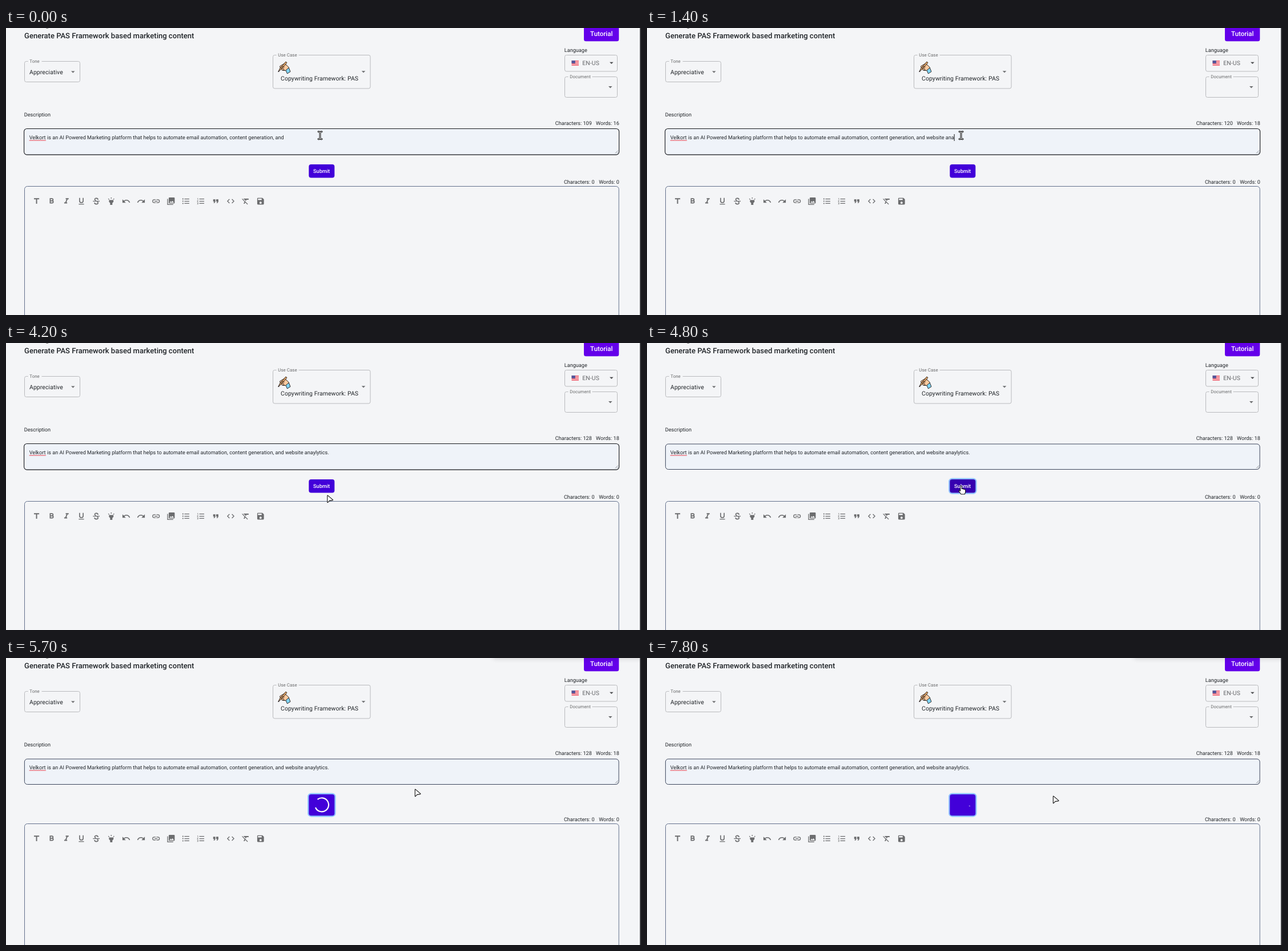
Animation of 1112 by 503 pixels, one loop 8000 ms. Source, as an HTML page:

```html
<!DOCTYPE html>
<html lang="en">
<head>
<meta charset="utf-8">
<title>Content generator</title>
<style>
html, body { margin: 0; width: 100%; height: 100%; overflow: hidden; background: #f4f5f7; }
svg { display: block; width: 1112px; height: 503px; font: 9.14px Roboto, sans-serif; fill: #212529; text-rendering: geometricPrecision; }
text { white-space: pre; }
.label { font-size: 7.84px; letter-spacing: .00938em; fill: #696a6b; }
.value { font-size: 10.45px; letter-spacing: .00938em; }
.end { text-anchor: end; }
.frame { fill: none; stroke: #b9babd; stroke-width: 1; }
.icon { fill: #6c6d6f; }
.line { fill: none; stroke: #6c6d6f; stroke-width: 2; }
.button { font-weight: 500; fill: #fff; }
.cursor { fill: #fff; stroke: #151515; stroke-width: 1.1; stroke-linejoin: round; }
</style>
</head>
<body>
<svg viewBox="0 0 1112 503">
  <defs>
    <filter id="blur" x="-20%" y="-80%" width="140%" height="260%"><feGaussianBlur stdDeviation="4.5"/></filter>
    <path id="beamShape" d="M-3-6.5q3 0 3 1.5v10q0 1.5-3 1.5M3-6.5q-3 0-3 1.5m0 10q0 1.5 3 1.5"/>
  </defs>
  <rect width="1112" height="503" fill="#f4f5f7"/>
  <path d="M70 0h4.5l-1 .8h-3z" fill="#555"/>
  <text x="32" y="17.6" font-size="13.06" font-weight="500">Generate PAS Framework based marketing content</text>

  <rect x="1012" y="-6" width="61.3" height="29.2" rx="3.5" fill="#6400ea"/>
  <text class="button" x="1042.8" y="13.6" font-size="11.5" text-anchor="middle">Tutorial</text>

  <g id="fields"></g>
  <text class="value" x="41" y="80.8">Appreciative</text>
  <text class="value" x="481" y="92.2">Copywriting Framework: PAS</text>
  <text class="value" x="1009.3" y="65.2" fill="#66676a">EN-US</text>
  <text x="977.8" y="42.4">Language</text>

  <g id="flag">
    <rect x="990.5" y="57" width="12.5" height="9" fill="#fbe9ec"/>
    <path d="M990.5 57.7h12.5m-12.5 2.5h12.5m-12.5 2.6h12.5m-12.5 2.5h12.5" stroke="#f0606f" stroke-width="1.4"/>
    <rect x="990.5" y="57" width="6.3" height="5" fill="#54569a"/>
  </g>

  <g stroke="#1d1613" stroke-width=".9" stroke-linejoin="round">
    <path d="M489.5 73.5l5.5-4.5 3 7.5-5.5 3.5z" fill="#7fd4f6"/>
    <path d="M479.5 67l7.5-4.5 5 3 3.5 4-6 5-6-.5-3-3z" fill="#ffcb9f"/>
    <path d="M477.5 75.5l2-4.5 10.5-12 2 1.8-10.5 12z" fill="#e3a768"/>
    <path d="M482 67.5l5.5 1m-6.5 1.5l6 1.5m-3 2l4 .3" fill="none"/>
    <path d="M476.5 76.5l2-1" stroke-width="1.5"/>
  </g>

  <text x="31.8" y="155.4">Description</text>
  <text id="chars" class="end" x="1025.9" y="169.9"></text>
  <text id="words" class="end" x="1073.8" y="169.9"></text>
  <rect id="area" rx="5" fill="#eff3f9"/>
  <path d="M1067 219.5l5-5m-2 5l2-2" fill="none" stroke="#74777c" stroke-width=".8"/>
  <text x="40.7" y="195.2">Velkort</text>
  <path d="M40.7 197h29.2" stroke="#e53b46"/>
  <text id="typed" x="72.1" y="195.2"></text>
  <path id="caret" stroke="#111"/>

  <rect id="ring" x="529.3" y="238" width="47" rx="5" fill="none" stroke="#8ec3ff" stroke-width="2.4"/>
  <rect id="submit" x="530.3" y="239" width="45" rx="4"/>
  <text id="submitText" class="button" x="552.6" y="254.3" text-anchor="middle">Submit</text>
  <circle id="spinner" r="20.2" fill="none" stroke="#fff" stroke-width="3.6"/>

  <g id="editor">
    <text class="end" x="1030.7" y="273">Characters: 0</text>
    <text class="end" x="1073.8" y="273">Words: 0</text>
    <rect class="frame" x="32.5" y="277.5" width="1040.7" height="260" rx="5" style="stroke:#62708c"/>
    <g id="toolbar"></g>
  </g>

  <rect id="toast" x="853" y="-40" width="290" height="41" fill="#000" opacity=".16" filter="url(#blur)"/>
  <rect x="1110" width="2" height="503" fill="#3a3b3f"/>

  <path id="arrow" class="cursor" d="M.5 .8V12.3Q.5 13.3 1.3 12.6L4.2 9.6 9.7 8.8Q10.6 8.5 9.9 7.8L1.4 .6Q.6 0 .5 .8z"/>
  <path id="hand" class="cursor" d="M3.2 9V1.7a1.2 1.2 0 0 1 2.5 0V6q2-.6 2.5.6 1.7-.5 2.2.7 1.8-.2 1.8 1.5v3.2l-1.4 3.5H4.5L1 10.7q-1-1.5.2-2 1-.2 2 1.3z"/>
  <g id="beam" fill="none" stroke-linecap="round">
    <use href="#beamShape" stroke="#111" stroke-width="2.9"/>
    <use href="#beamShape" stroke="#fff" stroke-width=".9"/>
  </g>
</svg>
<script>
const LOOP = 8000;
const el = Object.fromEntries([...document.querySelectorAll('[id]')].map(n => [n.id, n]));
const set = (node, attrs) => { for (const k in attrs) node.setAttribute(k, attrs[k]); };
const show = (node, on) => node.style.display = on ? '' : 'none';
const latest = (steps, t) => steps.reduce((found, s) => s[0] <= t ? s : found);

// Outlined fields; the notch leaves room for the label in the top border.
function field(x, y, w, h, arrowX, arrowY, color, label = '', notch = 0) {
  const r = x + w, b = y + h;
  const start = notch ? `M${x + 6 + notch} ${y}` : `M${x + 3} ${y}`;
  const finish = notch ? `H${x + 6}` : 'z';
  return `<path class="frame" d="${start}H${r - 3}q3 0 3 3V${b - 3}q0 3-3 3H${x + 3}q-3 0-3-3V${y + 3}q0-3 3-3${finish}"/>
    <path d="M${arrowX - 3.3} ${arrowY - 1.6}h6.6l-3.3 3.3z" fill="${color}"/>
    <text class="label" x="${x + 8.8}" y="${y + 2.8}">${label}</text>`;
}
el.fields.innerHTML =
  field(32.5, 58.5, 97, 36, 117.3, 77, '#6d6e70', 'Tone', 24) +
  field(467.5, 47.5, 170.5, 58.5, 626, 76.8, '#6d6e70', 'Use Case', 39) +
  field(978.5, 47.5, 92, 28.5, 1060.3, 61.3, '#4c4d4f') +
  field(978.5, 85.5, 92, 36, 1058.3, 103.7, '#6d6e70', 'Document', 42);

// Toolbar icons on a 24 unit grid.
const fill = d => `<path class="icon" fill-rule="evenodd" d="${d}"/>`;
const line = (d, w = 2) => `<path class="line" style="stroke-width:${w}" d="${d}"/>`;
const undo = fill('M12.5 8c-2.65 0-5.05 1-6.9 2.6L2 7v9h9l-3.6-3.6c1.4-1.2 3.1-1.9 5.1-1.9 3.5 0 6.5 2.3 7.6 5.5l2.4-.8C21.1 11 17.1 8 12.5 8z');
const rows = line('M8 6h13M8 12h13M8 18h13');
const icons = [
  fill('M5 4v3h5.5v12h3V7H19V4z'),
  line('M8.5 5.25h4.7a2.8 2.8 0 0 1 0 5.7H8.5h5.2a2.8 2.8 0 0 1 0 5.8H8.5z', 2.7),
  fill('M10 4v3h2.2l-3.4 8H6v3h8v-3h-2.2l3.4-8H18V4z'),
  line('M7.25 3v8a4.75 4.75 0 0 0 9.5 0V3', 2.5) + line('M5 20h14'),
  line('M16.5 8c0-5-8.8-5-8.8-.9Q7.7 9.5 11 10.5M14 13.5q3 1 2.7 3c-.4 4.5-9.4 4.5-9.4-.7', 2.5) + line('M3 12h18'),
  fill('M6 14l3 3v5h6v-5l3-3V9H6zM11 2h2v3h-2zM3.5 5.9l1.4-1.4L7 6.6 5.6 8zM17 6.6l2.1-2.1 1.4 1.4L18.4 8z'),
  undo,
  `<g transform="matrix(-1 0 0 1 24 0)">${undo}</g>`,
  line('M11 8H7a4 4 0 0 0 0 8h4M13 8h4a4 4 0 0 1 0 8h-4M8 12h8'),
  fill('M8 2h12q2 0 2 2v12q0 2-2 2H8q-2 0-2-2V4q0-2 2-2zm3 10l-3 4h12l-4-5-3 3.7z') + line('M3 6v15h15'),
  rows + [6, 12, 18].map(y => `<circle class="icon" cx="4" cy="${y}" r="1.6"/>`).join(''),
  rows + line('M2.5 4.5h1.5v4M2 10.5h2.5l-2.2 3h2.7M2 16h2.5v4H2m1-2h1.5', 1),
  fill('M6 17h3l2-4V7H5v6h3zM14 17h3l2-4V7h-6v6h3z'),
  line('M8.7 6.7L3.4 12l5.3 5.3M15.3 6.7l5.3 5.3-5.3 5.3'),
  fill('M3.3 5L2 6.3l7 7L6.5 19h3l1.6-3.7 5.6 5.7 1.3-1.3zM6 5v.2L8.8 8h2.4l-.7 1.7 2.1 2.1L14.2 8H20V5z'),
  fill('M17 3H5q-2 0-2 2v14q0 2 2 2h14q2 0 2-2V7zM15 9H5V5h10zM12 13a3 3 0 1 0 .01 0z')
];
el.toolbar.innerHTML = icons.map((icon, i) =>
  `<g transform="translate(${45.7 + i * 26.15} 295.7) scale(.653)">${icon}</g>`).join('');

const NAME_LENGTH = 7;
const intro = ' is an AI Powered Marketing platform that helps to automate email automation, content generation, and ';
const typing = [
  [0, ''],
  ...[...'website'].map((_, i) => [300 + i * 100, 'website'.slice(0, i + 1)]),
  [1200, 'website '], [1300, 'website a'], [1400, 'website ana'],
  [1800, 'website anay'], [1900, 'website anayt'], [2000, 'website anayti'],
  [2300, 'website anayt'], [2400, 'website anay'],
  [3000, 'website anaylyt'], [3100, 'website anaylytic'], [3300, 'website anaylytics.']
];
const pointer = [
  [0, 'beam', 550, 188.3], [3800, 'beam', 550.5, 200], [4000, 'hand', 550, 260.5],
  [4200, 'arrow', 562.3, 266.8], [4700, 'hand', 547, 252], [4800, 'hand', 545.5, 249.5],
  [5300, 'arrow', 690, 238], [5700, 'arrow', 715.8, 229.8],
  [6500, 'arrow', 741, 249], [7500, 'arrow', 710.8, 241.8]
];
const spinTicks = [51, 53, 55, 57, 59, 61, 63, 65, 67, 69, 70, 72, 75, 76, 78].map(n => [n * 100]);
const between = (t, a, b) => t >= a && t < b;
const ease = p => p * p * (3 - 2 * p);

function drawText(t) {
  const tail = intro + latest(typing, t)[1];
  el.typed.textContent = tail.slice(1);
  el.chars.textContent = `Characters: ${NAME_LENGTH + tail.length}`;
  el.words.textContent = `Words: ${1 + tail.trim().split(/\s+/).length}`;
  const x = 72.5 + el.typed.getComputedTextLength();
  set(el.caret, { d: `M${x} 186v12` });
  show(el.caret, between(t, 300, 4000));
  set(el.area, t < 4300
    ? { x: 31.6, y: 176.5, width: 1042, height: 45.6, stroke: '#15171b', 'stroke-width': 1.1 }
    : { x: 32.4, y: 177, width: 1040.7, height: 44.5, stroke: '#3c465c', 'stroke-width': 1 });
}

function drawSpinner(t) {
  const phase = (latest(spinTicks, t)[0] - 4972) / 1400 % 1;
  const grow = ease(Math.min(1, phase * 2));
  const slide = ease(Math.max(0, phase * 2 - 1));
  set(el.spinner, {
    transform: `translate(553 257.3) rotate(${phase * 360}) scale(.594)`,
    'stroke-dasharray': `${1 + 99 * grow} 200`,
    'stroke-dashoffset': -15 * grow - 110 * slide
  });
}

function draw(t) {
  drawText(t);
  const busy = t >= 5100;
  const hovered = between(t, 4000, 4200) || between(t, 4700, 5300);
  const height = busy ? 37.2 : 23.5;
  set(el.submit, { height, fill: hovered ? '#3600b0' : '#4200d9' });
  set(el.ring, { height: height + 2 });
  show(el.ring, t >= 4800);
  show(el.submitText, !busy);
  show(el.spinner, busy);
  if (busy) drawSpinner(t);
  set(el.editor, { transform: `translate(0 ${busy ? 13 : 0})` });
  show(el.toast, t >= 5300);

  const [, kind, x, y] = latest(pointer, t);
  for (const name of ['arrow', 'hand', 'beam']) show(el[name], name === kind);
  set(el[kind], { transform: `translate(${x} ${y})` });
}

function tick() {
  draw(performance.now() % LOOP);
  requestAnimationFrame(tick);
}
tick();
</script>
</body>
</html>
```
